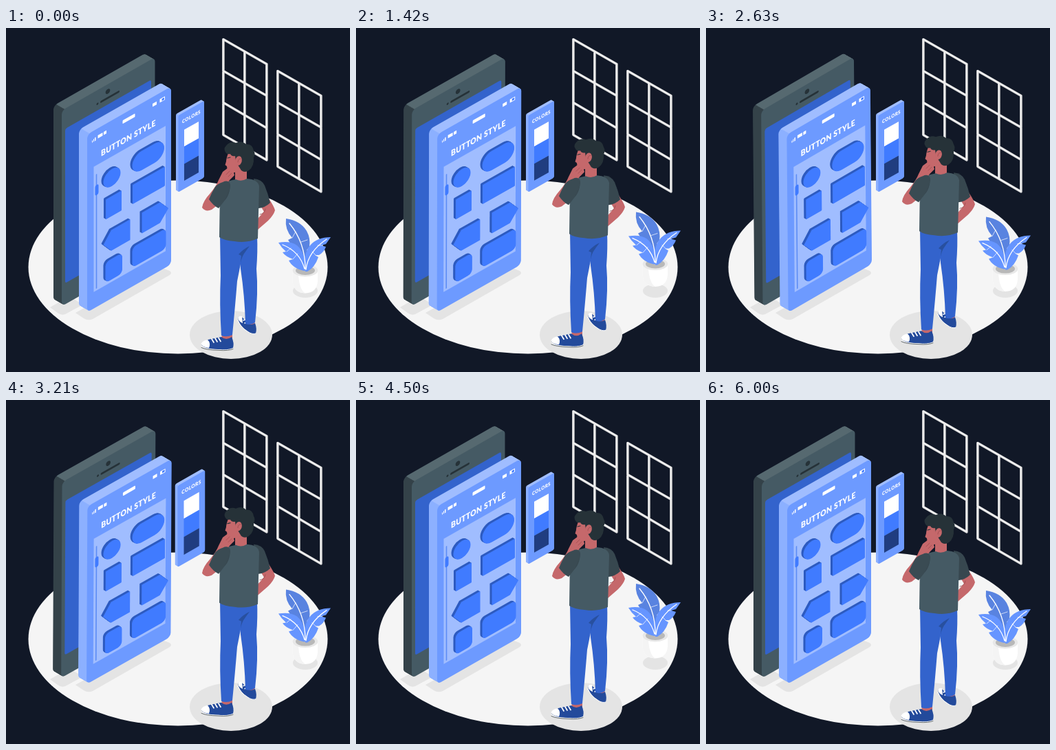
These frames come from a looping animation (500x500 px, 6040 ms). An HTML page:

```html
<!DOCTYPE html>
<html lang="en">
<head>
<meta charset="utf-8">
<title>Button style</title>
<style>
html, body { margin: 0; width: 100%; height: 100%; overflow: hidden; background: #111827; }
svg { display: block; width: 100vw; height: 100vh; }
text { font-family: Lato, "Open Sans", sans-serif; font-weight: 900; fill: #fff; }
.line { fill: none; stroke-linecap: round; stroke-linejoin: round; }
.skin { fill: #c5686b; }
</style>
</head>
<body>
<svg viewBox="0 0 500 500">
  <defs>
    <linearGradient id="dark"><stop offset=".03" stop-color="#344249"/><stop offset=".03" stop-color="#566970"/></linearGradient>
    <linearGradient id="light"><stop offset=".03" stop-color="#8cb0ff"/><stop offset=".03" stop-color="#a0bdff"/></linearGradient>
    <g id="window" class="line">
      <path d="M316 16.500L379 52.500V192L316 155.500ZM347 34.500V173.500M316 62.500L379 98.500M316 108.500L379 145.500" stroke="#d6d6d6" stroke-width="3.400"/>
      <path d="M315.500 16L378.500 52V191.500L315.500 155ZM346.500 34V173M315.500 62L378.500 98M315.500 108L378.500 145" stroke="#f2f2f2" stroke-width="1.900"/>
    </g>
  </defs>

  <ellipse cx="250" cy="347.500" rx="217.500" ry="126" fill="#f5f5f5"/>
  <g fill="#e4e4e4">
    <path d="M64 406L92 390L112 402L86 416Q80 418 75 414Z"/>
    <path d="M101 414L222 347L238 353Q242 356 238 359L126 423Q119 426 113 422Z"/>
    <ellipse cx="327" cy="446" rx="60" ry="35"/>
    <ellipse cx="435" cy="382" rx="18" ry="10"/>
  </g>
  <use href="#window"/>
  <use href="#window" x="79" y="46"/>

  <g id="phones">
    <g transform="matrix(1 -.57 0 1 0 0)">
      <rect x="81" y="166" width="135.500" height="284.500" rx="6" fill="#455a64" data-depth="12" data-side="url(#dark)"/>
      <rect x="86" y="195.500" width="125" height="224.500" rx="3" fill="#3363cc"/>
      <g fill="#263238">
        <circle cx="148" cy="176.500" r="3.300"/>
        <circle cx="133" cy="186" r="1.500"/>
        <rect x="137" y="184.500" width="28" height="3" rx="1.500"/>
      </g>

      <rect x="118" y="222" width="122" height="258.500" rx="6" fill="#6d9aff" data-depth="12" data-side="url(#light)"/>
      <rect x="127.500" y="274.500" width="104.500" height="182" fill="#a0bdff"/>
      <g fill="#fff">
        <path d="M125 235h1v3h-1zM127 234h1v4h-1zM129 233h1.500v5h-1.500zM133.500 232h7v4.500h-7zM142 232h4v4.500h-4zM213 231.500h6v4.500h-6zM223.500 231h7.500v5h-7.500z"/>
        <rect x="169.500" y="231" width="18" height="5" rx="1"/>
        <path d="M226.500 232h3.500v3h-3.500z" fill="#407bff"/>
      </g>
      <text transform="matrix(.866 0 0 1 138 265.500)" font-size="12" letter-spacing=".3">BUTTON STYLE</text>
      <path d="M131.500 288V453" class="line" stroke="#5c8cf5" stroke-width="1.600"/>
      <rect x="129.500" y="303" width="5" height="15" rx="2.500" fill="#407bff"/>
      <g id="buttons" fill="#407bff">
        <circle cx="154" cy="305" r="12.500"/>
        <rect x="183.500" y="291" width="46.500" height="28" rx="14"/>
        <rect x="145" y="332" width="23" height="29" rx="1"/>
        <rect x="184" y="333" width="47" height="28" rx="1"/>
        <path d="M180.500 381H153L141.500 396L153 411H180.500Z"/>
        <path d="M197.500 381H224L236 396.500L224 411H197.500Z"/>
        <rect x="144.500" y="423" width="24.500" height="30" rx="6"/>
        <rect x="183.500" y="423.500" width="49" height="29.500" rx="6"/>
      </g>
    </g>
  </g>

  <g id="palette">
    <g transform="matrix(1 -.57 0 1 0 0)">
      <rect x="250.500" y="270" width="37.500" height="111.500" rx="2" fill="#6d9aff" data-depth="3.500" data-side="url(#light)"/>
      <text transform="matrix(.866 0 0 1 256 285)" font-size="7.200" letter-spacing=".4">COLORS</text>
      <rect x="259" y="295.500" width="21" height="24.500" fill="#fff"/>
      <rect x="259" y="320" width="21" height="25" fill="#407bff"/>
      <rect x="259" y="345" width="21" height="24.500" fill="#203d80"/>
    </g>
  </g>

  <g id="plant">
    <path d="M416.500 354V368Q418 385 435 385.500Q452 385 453 368V354Z" fill="#fff"/>
    <path d="M416.500 354V368Q418 385 435 385.500Q426 380 425 358Z" fill="#f4f4f4"/>
    <ellipse cx="435" cy="352.500" rx="18.300" ry="9" fill="#e8e8e8"/>
    <ellipse cx="435" cy="352.500" rx="14" ry="6.500" fill="#b8b8b8"/>
    <path d="M433 352Q430 331 422 323Q415 317 410 308L416 305Q405 293 407 277Q428 280 437 295Q443 306 441 318L437 323L441 324Q440 340 437 352Z" fill="#5983e0"/>
    <g fill="#6695ff">
      <path d="M433 353C421 350 415 345 411 338L417 336Q406 332 402 326L407 325Q400 319 396 312Q413 309 423 316Q435 326 436 352Z"/>
      <path d="M435 354C432 340 434 325 442 316Q452 304 472 304L465 314L458 316L465 318Q462 326 455 330L449 330L454 333Q449 348 438 354Z"/>
    </g>
    <g class="line" stroke="#fff" stroke-width="1.300">
      <path d="M412 284Q435 312 435 350M402 315Q427 325 434 350M466 307Q439 325 436 351"/>
      <path d="M421 296L416 305M429 311L438 308M414 320L408 325M424 328L417 336M453 316L458 316M445 325L450 330" stroke-width=".7"/>
    </g>
  </g>

  <g id="man">
    <!-- shoes and ankles -->
    <path d="M314 444H329V455H313ZM348 426L361 424L362 434L350 436Z" class="skin"/>
    <path d="M337 421Q342 416 349 427Q355 434 362 429Q365 437 363 444Q357 446 350 440Q338 432 337 421Z" fill="#234a9b"/>
    <path d="M337 421Q339 418 343 419L344 429Q338 427 337 421Z" fill="#fff"/>
    <path d="M337 425Q341 435 351 441Q358 446 363 444" class="line" stroke="#fff" stroke-width="1"/>
    <path d="M345 425l4 -2M347 429l4 -2" class="line" stroke="#fff" stroke-width="1.500"/>
    <path d="M284 460Q286 454 298 452L313 449Q320 455 328 449Q332 458 330 465Q324 469 309 467Q288 467 284 460Z" fill="#234a9b"/>
    <path d="M283.500 459Q286 454 293 453Q298 458 295 465Q285 464 283.500 459Z" fill="#fff"/>
    <path d="M284 463Q290 467 308 467.500Q322 469 330 465.500" class="line" stroke="#fff" stroke-width="1"/>
    <path d="M284 464.500Q291 468 309 468.400Q323 469.500 330 466.500" class="line" stroke="#263238" stroke-width=".7"/>
    <path d="M299 452l3 5M304 451l3 5M309 450.500l3 5" class="line" stroke="#fff" stroke-width="1.700"/>

    <!-- trousers -->
    <path d="M338 302H365Q366 325 364 350Q367 385 362 428Q355 433 348 430Q347 390 341 350Z" fill="#3363cc"/>
    <path d="M311 300H362L359 316Q346 321 343 333L336 368Q333 405 329 446Q321 450 313 447Q310 400 312 360Z" fill="#3363cc"/>
    <path d="M354 317Q345 321 338 329L342 331L341 341Q343 332 346 328Q350 322 354 317Z" fill="#28509f"/>

    <!-- far arm -->
    <path d="M366 293V277L375 267L369 257L382 248Q390 260 391 265Q389 272 381 280Z" class="skin"/>
    <path d="M360 219Q372 220 376 229Q381 241 384 254Q377 261 367 262Z" fill="#37474f"/>
    <path d="M369 271Q376 270 377 263" class="line" stroke="#9c4a4d" stroke-width=".8"/>

    <!-- neck and shirt -->
    <path d="M333 203L350 205V224Q341 228 333 221Z" class="skin"/>
    <path d="M325 222L334 220Q342 224 350 219Q366 220 368 230L366 306Q350 313 332 310Q317 309 310 304L311 240Q315 226 325 222Z" fill="#455a64"/>
    <path d="M312 255Q325 248 326 228Q321 227 317 240Z" fill="#37474f"/>

    <!-- thinking arm -->
    <path d="M297 240Q286 252 285 261Q290 268 299 264L313 253L307 246L325 221L332 214L330 206L323 203L315 209L309 221Q306 229 297 240Z" class="skin"/>
    <path d="M315 224Q323 220 326 227Q325 244 309 262Q301 258 295 249Q299 239 304 231Q308 226 315 224Z" fill="#3a4b53"/>

    <!-- head -->
    <path d="M323 182Q320 190 320 194L318.500 199L321 201L322 208Q325 212 332 210L342 207L346 190L338 178Z" class="skin"/>
    <path d="M320 182Q315 176 320 171Q326 164 334 167Q343 163 349 169Q358 168 360 178Q363 183 360 188Q361 201 353 207Q347 211 342 207L337 199L334 193L333 186Q328 187 326 183Q323 184 320 182Z" fill="#263238"/>
    <ellipse cx="338" cy="193" rx="4.800" ry="6.800" class="skin" transform="rotate(12 338 193)"/>
    <path d="M337 195Q337 190 341 190" class="line" stroke="#9c4a4d" stroke-width=".8"/>
    <path d="M322 189l4 -1" class="line" stroke="#263238" stroke-width="1.200"/>
    <path d="M320 213L325 208M323 216L328 211" class="line" stroke="#9c4a4d" stroke-width=".7"/>
  </g>
</svg>
<script>
const byId = id => document.getElementById(id);
const LOOP = 6040, BEAT = 3000;

// Stack shifted copies behind a face to give it thickness.
function extrude(face, depth, side) {
  for (let d = depth; d > 0; d -= .5) {
    const copy = face.cloneNode();
    copy.setAttribute("fill", side);
    copy.setAttribute("transform", `translate(${-d} ${-1.15 * d})`);
    face.before(copy);
  }
}
document.querySelectorAll("[data-depth]").forEach(el => extrude(el, +el.dataset.depth, el.dataset.side));
[...byId("buttons").children].forEach(el => extrude(el, 3, "#2d5bc0"));

// Linear interpolation through [phase, value] keys.
function tween(keys, p) {
  const i = Math.max(1, keys.findIndex(k => k[0] >= p));
  const [a, x] = keys[i - 1], [b, y] = keys[i];
  return x + (y - x) * (p - a) / (b - a);
}
const SWAY = [[0, 0], [.25, 1], [.75, -1], [1, 0]];
const FLOAT = [[0, 0], [.5, -10], [1, 0]];
const PULSE = [[0, 1], [.1, 1.086], [.28, 1.077], [.45, 1], [1, 1]];

const place = (id, transform) => byId(id).setAttribute("transform", transform);

function draw(now) {
  const t = now % LOOP, p = t % BEAT / BEAT;
  place("phones", `rotate(${tween(SWAY, p)} 154 225)`);
  place("palette", `translate(267.5 170.5) scale(${tween(PULSE, p)}) translate(-267.5 -170.5)`);
  place("plant", `translate(0 ${tween(FLOAT, p)})`);
  place("man", `translate(0 ${tween(FLOAT, t % (2 * BEAT) / (2 * BEAT))})`);
  requestAnimationFrame(draw);
}
requestAnimationFrame(draw);
</script>
</body>
</html>
```
